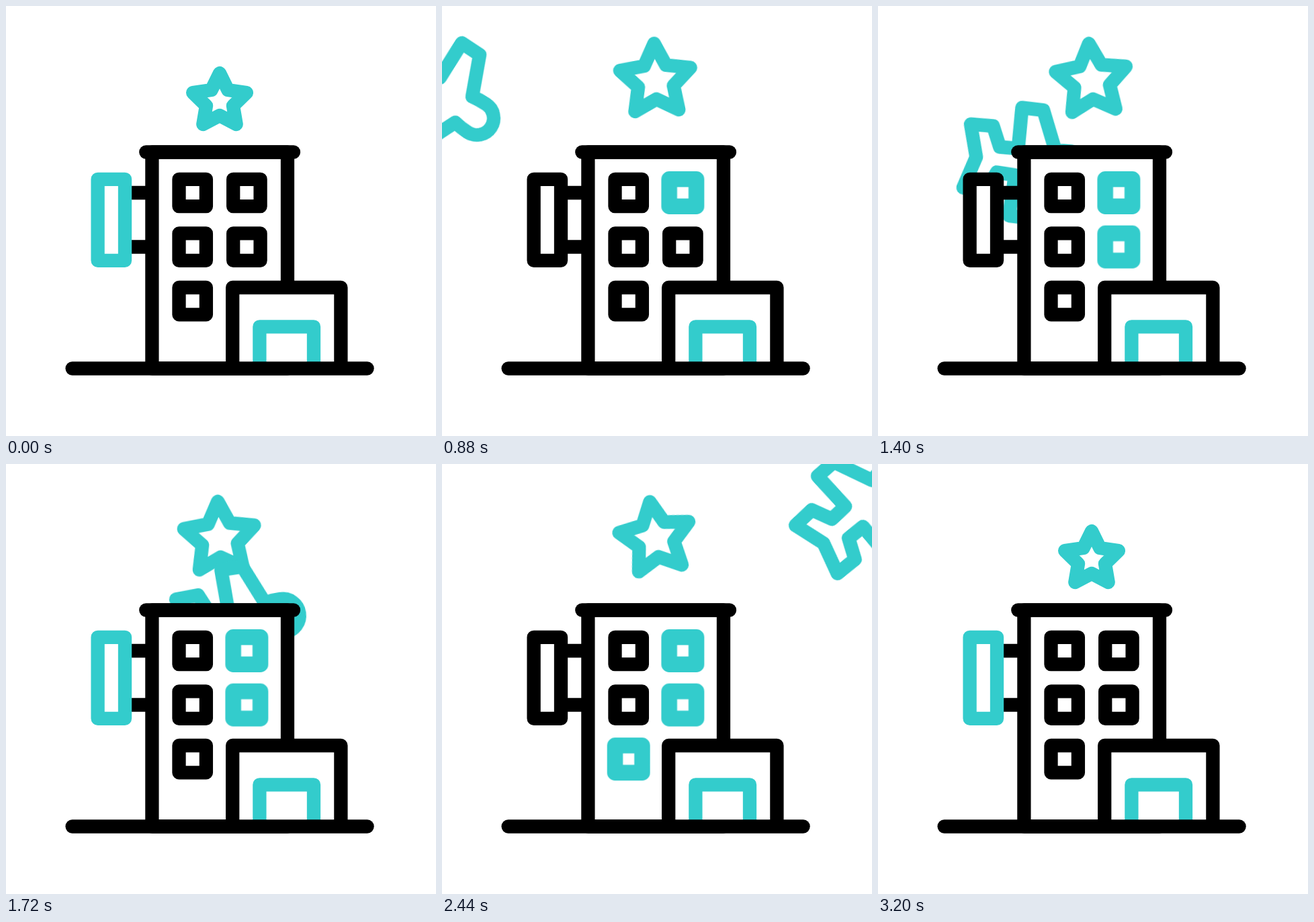
Recreate the animation shown at these times as an HTML page. Size 640 by 640 pixels, loop 3520 ms.

```html
<!DOCTYPE html>
<html lang="en">
<head>
<meta charset="utf-8">
<title>Hotel and plane</title>
<style>
  :root { --teal: #33cccc; --loop: 3520ms linear infinite; }
  html, body { margin: 0; width: 100%; height: 100%; overflow: hidden; background: #fff; }
  svg { display: block; width: 100%; height: 100%; }
  svg * { vector-effect: non-scaling-stroke; }

  .line { fill: none; stroke: #000; stroke-width: 20.3; stroke-linejoin: round; }
  .solid { fill: #fff; }
  .round { stroke-linecap: round; }
  .teal { stroke: var(--teal); }

  .plane { animation: fly var(--loop); }
  .grow { animation: grow var(--loop); }
  .sway { animation: sway var(--loop); }
  .sign { animation: blink var(--loop); animation-timing-function: step-end; }
  .lit { stroke: var(--teal); stroke-width: 23.5; opacity: 0; animation: var(--loop) step-end; }
  .w1 { animation: light1 3520ms step-end infinite; }
  .w2 { animation: light2 3520ms step-end infinite; }
  .w3 { animation: light3 3520ms step-end infinite; }

  @keyframes fly {
    0%, 17.045% { transform: translate(-121px, 42px) rotate(47deg); }
    19.886% { transform: translate(-76px, 78px) rotate(42.5deg); }
    22.159% { transform: translate(-37px, 106.5px) rotate(38.6deg); }
    25% { transform: translate(11px, 140px) rotate(33.5deg); }
    28.693% { transform: translate(71.4px, 178px) rotate(26.4deg); }
    32.386% { transform: translate(128.5px, 205.5px) rotate(19.3deg); }
    36.506% { transform: translate(189px, 225.6px) rotate(12.3deg); }
    40.625% { transform: translate(248.5px, 238px) rotate(5.4deg); }
    44.744% { transform: translate(306.8px, 241.2px) rotate(-1.5deg); }
    48.864% { transform: translate(363.5px, 233px) rotate(-8.5deg); }
    53.977% { transform: translate(430.8px, 210px) rotate(-17.5deg); }
    59.091% { transform: translate(498px, 174.5px) rotate(-26.5deg); }
    64.205% { transform: translate(567px, 123.7px) rotate(-34deg); }
    69.318% { transform: translate(636px, 58.5px) rotate(-41.1deg); }
    73.864% { transform: translate(698px, -8px) rotate(-47.5deg); }
    79.545%, 100% { transform: translate(780px, -100px) rotate(-55deg); }
  }

  @keyframes grow {
    0%, 5.682%, 90.909%, 100% { transform: translate(318px, 142px) scale(1); }
    19.886%, 76.705% { transform: translate(318px, 111px) scale(1.315); }
  }

  @keyframes sway {
    0%, 5.682% { transform: rotate(0deg); animation-timing-function: ease-in-out; }
    19.886% { transform: rotate(-8deg); animation-timing-function: ease-in; }
    25% { transform: rotate(-2.5deg); animation-timing-function: ease-out; }
    32.386% { transform: rotate(9.5deg); animation-timing-function: ease-in-out; }
    43.75% { transform: rotate(-9deg); animation-timing-function: ease-in; }
    48.864% { transform: rotate(-3deg); animation-timing-function: ease-out; }
    53.693% { transform: rotate(5deg); animation-timing-function: ease-in; }
    59.091% { transform: rotate(0deg); animation-timing-function: ease-out; }
    69.318% { transform: rotate(-9deg); animation-timing-function: ease-in-out; }
    78%, 100% { transform: rotate(0deg); }
  }

  @keyframes blink {
    0%, 26.989%, 48.295%, 69.602%, 90.909%, 100% { stroke: var(--teal); }
    16.335%, 37.642%, 58.949%, 80.256% { stroke: #000; }
  }

  @keyframes light1 { 0%, 90.909%, 100% { opacity: 0; } 11% { opacity: 1; } }
  @keyframes light2 { 0%, 90.909%, 100% { opacity: 0; } 39.6% { opacity: 1; } }
  @keyframes light3 { 0%, 90.909%, 100% { opacity: 0; } 68.2% { opacity: 1; } }
</style>
</head>
<body>
<svg viewBox="0 0 640 640">
  <defs>
    <path id="pane" d="M-20.2-20.2h40.4v40.4h-40.4z"/>
  </defs>

  <g class="grow"><g class="sway">
    <path class="line teal" d="M0-42 12.3-17 39.9-13 20 6.5 24.7 34 0 21-24.7 34-20 6.5-39.9-13-12.3-17z"/>
  </g></g>

  <path class="line teal plane" d="M-91 0-105-47.5-71.5-48.8-58-19-30.5-20-32-81H0L25-23
    Q36-25 48.5-25A25 25 0 0 1 48.5 25Q36 25 25 23L0 81H-32L-30.5 20-58 19-71.5 48.8-105 47.5z"/>

  <!-- sign -->
  <path class="line" d="M183 278H212M183 358.5H212"/>
  <path class="line solid sign" d="M136.6 257.8h40.4v121h-40.4z"/>

  <!-- tower -->
  <path class="line solid" d="M217.4 217.5V539.5H419V217.5z"/>
  <path class="line round" d="M208.3 217.5H428"/>
  <use href="#pane" class="line" x="277.7" y="278"/>
  <use href="#pane" class="line" x="358.4" y="278"/>
  <use href="#pane" class="line" x="277.7" y="358.6"/>
  <use href="#pane" class="line" x="358.4" y="358.6"/>
  <use href="#pane" class="line" x="277.7" y="439.2"/>
  <use href="#pane" class="line lit w1" x="358.4" y="278"/>
  <use href="#pane" class="line lit w2" x="358.4" y="358.6"/>
  <use href="#pane" class="line lit w3" x="277.7" y="439.2"/>

  <!-- entrance -->
  <path class="line solid" d="M337.2 539.5V419H498.4V539.5"/>
  <path class="line teal" d="M377.4 535V477.3H458V535"/>
  <path class="line round" d="M98.6 539.5H537.6"/>
</svg>
</body>
</html>
```
